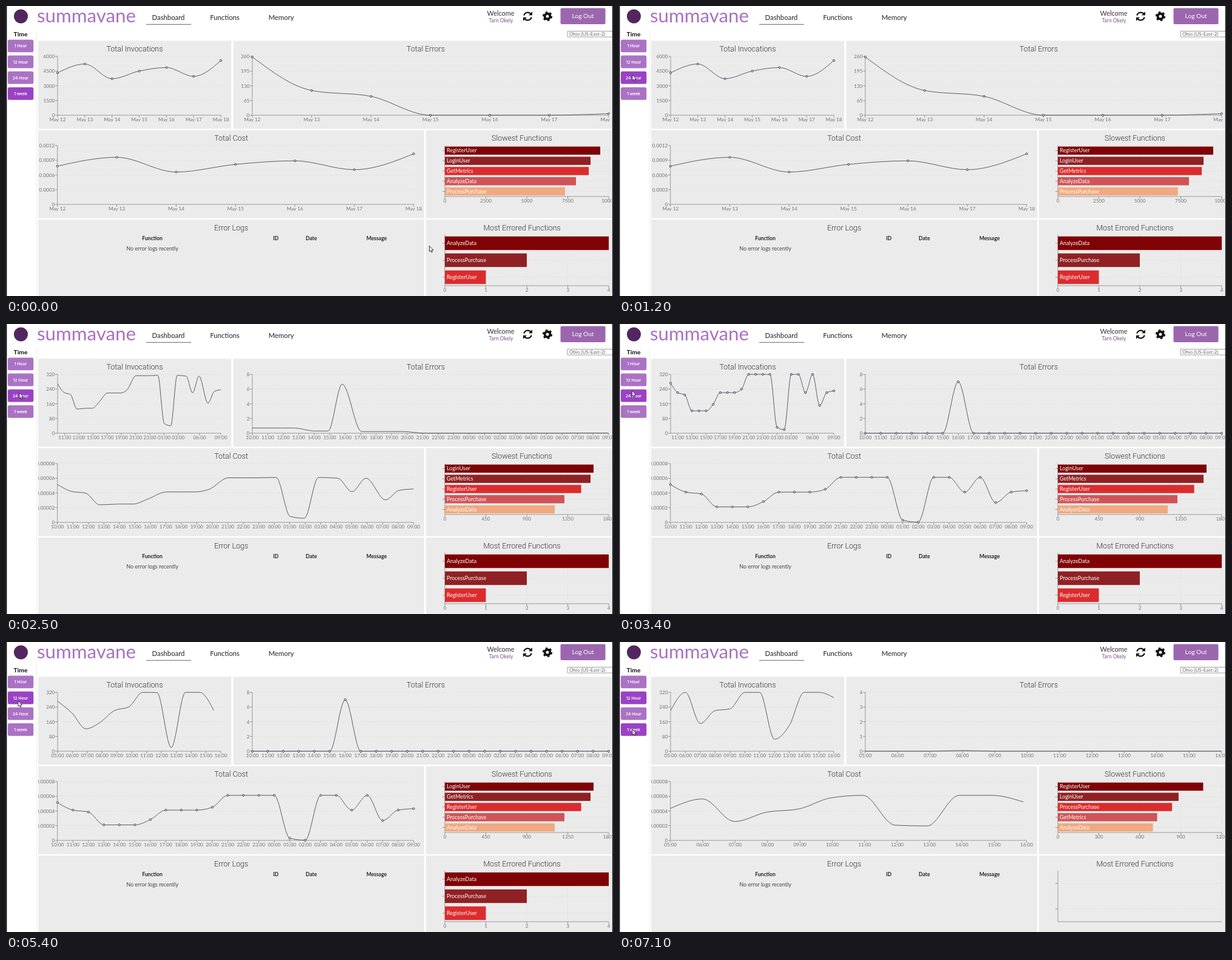
An HTML page for the animation above (7.2 s loop, 1000 by 478 pixels).

```html
<!DOCTYPE html>
<html lang="en">
<head>
<meta charset="utf-8">
<title>Dashboard</title>
<style>
html, body { margin: 0; width: 100%; height: 100%; overflow: hidden; background: #fff; }
svg { display: block; width: 100vw; height: 100vh; font-family: Lato, "Open Sans", sans-serif; }
.title { font: 300 12.4px Roboto, sans-serif; fill: #333; text-anchor: middle; }
.tick { font-size: 8.2px; fill: #747474; }
.axis { stroke: #777; stroke-width: .7; fill: none; }
.grid { stroke: #d9d9d9; stroke-width: .7; stroke-dasharray: 2 2; fill: none; }
.line { stroke: #4a4d54; stroke-width: .9; fill: none; }
.dot { stroke: #363d4c; stroke-width: .9; fill: #d4d6dc; }
.name { font-size: 8.9px; fill: #fff; }
.btn { font: 600 6.7px Inter, sans-serif; fill: #fff; text-anchor: middle; }
.mid { text-anchor: middle; }
.end { text-anchor: end; }
.head { font-size: 8.6px; font-weight: 700; fill: #222; text-anchor: middle; }
.note { font-size: 9px; fill: #444; text-anchor: middle; }
</style>
</head>
<body>
<svg viewBox="0 0 1000 478" preserveAspectRatio="none">
  <clipPath id="view"><rect x="53" y="57" width="945" height="421"/></clipPath>
  <rect width="1000" height="478" fill="#fff"/>
  <path d="M50.5 40V478" stroke="#ececec"/>

  <circle cx="24.5" cy="17" r="11.5" fill="#54265f"/>
  <text x="51" y="26.5" font-size="31.3" fill="#a972c1">summavane</text>
  <g class="mid" font-size="11.3" fill="#222">
    <text x="267.5" y="22.5">Dashboard</text>
    <text x="360.5" y="22.5">Functions</text>
    <text x="453.5" y="22.5">Memory</text>
  </g>
  <path d="M231 30.3H305" stroke="#85808a" stroke-width="1.3"/>
  <g class="mid">
    <text x="815" y="16" font-size="10.9" fill="#38293f">Welcome</text>
    <text x="815.5" y="27" font-size="8.5" fill="#7d5092">Tarn Okely</text>
  </g>
  <g fill="none" stroke="#111" stroke-width="2.2">
    <path d="M853.3 15.5A6.5 6.5 0 0 1 864.5 12.8M865.7 18.5A6.5 6.5 0 0 1 854.5 21.2"/>
    <path d="M867 9.3V15.3H861ZM852 24.7V18.7H858Z" fill="#111" stroke="none"/>
    <circle cx="892" cy="17" r="4.4" stroke-width="3.8"/>
    <circle cx="892" cy="17" r="6.9" stroke-width="2.4" stroke-dasharray="3.61 3.61"/>
  </g>
  <rect x="913.5" y="3.5" width="74" height="26.5" rx="2" fill="#9c66af"/>
  <text class="mid" x="950.5" y="20.3" font-size="10.2" fill="#fff">Log Out</text>
  <path d="M999 41.5H925V51H999" fill="#fff" stroke="#888" stroke-width=".8"/>
  <text x="928" y="49.2" font-size="8" fill="#666">Ohio (US-East-2)</text>

  <text class="mid" x="24" y="50" font-size="10.3" font-weight="700" fill="#111">Time</text>
  <g id="buttons"></g>
  <g clip-path="url(#view)"><g id="panels"></g><g id="charts"></g></g>
  <path d="M.7 0V478M999.5 0V478" stroke="#15131a" stroke-width="1.4"/>
  <path id="cursor" d="M0 0V9.2L2.1 7.4L3.6 10.6L5.1 9.9L3.7 6.8H6.5Z" fill="#fff" stroke="#222" stroke-width=".9"/>
</svg>
<script>
const LOOP = 7200, LINE_MS = 1875, BAR_MS = 500, PLOT = 97;
const DAY_AT = 1300, HALF_AT = 5945;
const $ = id => document.getElementById(id);
const n = v => +v.toFixed(2);
const lerp = (a, b, p) => a + (b - a) * p;
const clamp = p => Math.max(0, Math.min(1, p));
const smooth = p => (p = clamp(p), p * p * (3 - 2 * p));
const range = (len, f) => Array.from({ length: len }, (_, i) => f(i));
const text = (x, y, s, cls) => `<text x="${n(x)}" y="${n(y)}" class="${cls}">${s}</text>`;
const rect = (x, y, w, h, fill, rx = 0) =>
  `<rect x="${n(x)}" y="${n(y)}" width="${n(w)}" height="${n(h)}" rx="${rx}" fill="${fill}"/>`;
const path = (d, cls) => `<path d="${d}" class="${cls}"/>`;

// cubic-bezier(.25, .1, .25, 1)
function ease(x) {
  if (x <= 0 || x >= 1) return clamp(x);
  let lo = 0, hi = 1, s;
  for (let i = 0; i < 24; i++) {
    s = (lo + hi) / 2;
    if (.75 * s * (1 - s) + s ** 3 < x) lo = s; else hi = s;
  }
  return .3 * s * (1 - s) ** 2 + 3 * s * s * (1 - s) + s ** 3;
}

// Monotone cubic through the points
function curve(pts) {
  const last = pts.length - 1;
  const slope = i => (pts[i + 1][1] - pts[i][1]) / ((pts[i + 1][0] - pts[i][0]) || 1e-6);
  const inner = i => {
    const h0 = pts[i][0] - pts[i - 1][0], h1 = pts[i + 1][0] - pts[i][0];
    const s0 = slope(i - 1), s1 = slope(i);
    const p = (s0 * h1 + s1 * h0) / ((h0 + h1) || 1e-6);
    return (Math.sign(s0) + Math.sign(s1)) * Math.min(Math.abs(s0), Math.abs(s1), Math.abs(p) / 2) || 0;
  };
  const m = pts.map((_, i) => i && i < last ? inner(i) : 0);
  m[0] = (3 * slope(0) - m[1]) / 2;
  m[last] = (3 * slope(last - 1) - m[last - 1]) / 2;
  let d = `M${n(pts[0][0])} ${n(pts[0][1])}`;
  for (let i = 0; i < last; i++) {
    const [x0, y0] = pts[i], [x1, y1] = pts[i + 1], h = (x1 - x0) / 3;
    d += `C${[x0 + h, y0 + h * m[i], x1 - h, y1 - h * m[i + 1], x1, y1].map(n).join(" ")}`;
  }
  return d;
}

// Load in percent: per day, and per hour from 10:00 to 16:00 next day
const daily = [72, 87, 62, 75, 81, 66, 93];
const hourly = [85, 69, 65, 38, 38, 38, 49, 69, 69, 69, 75, 100, 100, 100, 100, 10, 6, 100, 100,
  69, 100, 47, 69, 72, 100, 100, 20, 44, 100, 100, 91];
const day = hourly.slice(0, 24), half = hourly.slice(19);
const dailyCost = v => v - 7, hourlyCost = v => .81 * v - 4.4;

const hours = (from, len) => range(len, i => String((from + i) % 24).padStart(2, "0") + ":00");
const weekX = range(7, i => "May " + (12 + i)), dayX = hours(10, 24), halfX = hours(5, 12);
const narrowX = dayX.map((s, i) => (i < 18 ? i % 2 : i % 3 === 2) ? s : "");

const state = (start, labels, max, digits, percent) => ({ start, labels, max, digits, percent });
const lines = [
  { x0: 85, x1: 354, top: 83, states: [
    state(-1e9, weekX, 6000, 0, daily),
    state(DAY_AT, narrowX, 320, 0, day),
    state(5380, halfX, 320, 0, half)] },
  { x0: 405.7, x1: 992.7, top: 83, states: [
    state(-1e9, weekX, 260, 0, [99, 42, 32, 0, 0, 0, 2.6]),
    state(DAY_AT, dayX, 8, 0, day.map((_, i) => i === 6 ? 87.5 : 0)),
    state(5510, halfX, 4, 0, half.map(() => 0))] },
  { x0: 84.7, x1: 671.6, top: 230, states: [
    state(-1e9, weekX, .0012, 4, daily.map(dailyCost)),
    state(DAY_AT, dayX, .00008, 5, day.map(hourlyCost)),
    state(6200, halfX, .00008, 5, half.map(hourlyCost))] }
];

const reds = ["#7f0205", "#8f2124", "#dc2b2d", "#d05457", "#f0a980"];
const slowest = [
  { start: -1e9, step: 2500,
    bars: { RegisterUser: 9480, LoginUser: 8890, GetMetrics: 8780, AnalyzeData: 8000, ProcessPurchase: 7330 } },
  { start: DAY_AT, step: 450,
    bars: { LoginUser: 1633, GetMetrics: 1600, RegisterUser: 1497, ProcessPurchase: 1313, AnalyzeData: 1207 } },
  { start: HALF_AT, step: 300,
    bars: { RegisterUser: 1064, LoginUser: 884, ProcessPurchase: 836, GetMetrics: 727, AnalyzeData: 696 } }
];
const errored = [
  { start: -1e9, step: 1, bars: { AnalyzeData: 4, ProcessPurchase: 2, RegisterUser: 1 } },
  { start: HALF_AT, step: 0, bars: {} }
];

// The newest state that has begun, and the one before it
function current(states, t) {
  const i = states.filter(s => s.start <= t).length - 1;
  return [states[i], states[i - 1]];
}

function lineChart({ x0, x1, top, states }, t) {
  const [now, prev] = current(states, t), { labels, max, digits, percent } = now;
  const base = top + PLOT;
  const at = (v, i) => [lerp(x0, x1, i / (v.length - 1)), base - PLOT * v[i] / 100];
  const p = prev ? ease((t - now.start) / LINE_MS) : 1;
  const pts = percent.map((_, i) => {
    const to = at(percent, i);
    if (p === 1) return to;
    const from = at(prev.percent, Math.floor(i * prev.percent.length / percent.length));
    return to.map((v, k) => lerp(from[k], v, p));
  });
  let grid = "", ticks = `M${x0} ${top}V${base}H${x1}`, out = "";
  for (let i = 0; i <= 4; i++) {
    const y = base - PLOT * i / 4;
    if (i) grid += `M${x0} ${y}H${x1}`;
    ticks += `M${x0 - 4} ${y}h4`;
    out += text(x0 - 4.5, y + 3, i ? (max * i / 4).toFixed(digits) : 0, "tick end");
  }
  labels.forEach((s, i) => {
    if (!s) return;
    const x = at(percent, i)[0];
    ticks += `M${n(x)} ${base}v4`;
    out += text(x, base + 10.2, s, "tick mid");
  });
  out = path(grid, "grid") + path(ticks, "axis") + out + path(curve(pts), "line");
  if (p === 1) out += pts.map(([x, y]) => `<circle cx="${n(x)}" cy="${n(y)}" r="1.6" class="dot"/>`).join("");
  return out;
}

function barChart(states, top, base, t) {
  const [now, prev] = current(states, t), { step } = now;
  const widths = s => Object.values(s.bars).map(v => 67.5 * v / s.step);
  const names = Object.keys(now.bars), to = widths(now), from = prev ? widths(prev) : to;
  const p = prev ? ease((t - now.start) / BAR_MS) : 1;
  const rows = names.length || 2, band = (base - top) / rows;
  let grid = "", ticks = `M723 ${top}V${base}H993`, out = "";
  for (let i = 0; i < rows; i++) {
    const y = top + band * (i + .5);
    grid += `M723 ${n(y)}H993`;
    ticks += `M719 ${n(y)}h4`;
    if (!names[i]) continue;
    out += rect(723, y - band * .4, lerp(from[i], to[i], p), band * .8, reds[i]);
    if (p === 1) out += text(726, y + 3, names[i], "name");
  }
  for (let i = step ? 0 : 4; i <= 4; i++) {
    const x = 723 + 67.5 * i;
    grid += `M${x} ${top}V${base}`;
    if (!step) continue;
    ticks += `M${x} ${base}v4`;
    out += text(x, base + 10.2, i * step, "tick mid");
  }
  return path(grid, "grid") + path(ticks, "axis") + out;
}

// Cursor legs: start, end, destination
const legs = [[0, 700, 22, 113.5], [3250, 3750, 20, 97], [6400, 6950, 22, 144]];
function cursorAt(t) {
  let x = 697.5, y = 395.5;
  for (const [a, b, tx, ty] of legs) {
    const p = smooth((t - a) / (b - a));
    x = lerp(x, tx, p);
    y = lerp(y, ty, p);
  }
  return [x, y];
}

function buttons(t, cx, cy) {
  const picked = t < 800 ? 3 : t < 4500 ? 2 : 1;
  return ["1 Hour", "12 Hour", "24 Hour", "1 week"].map((s, i) => {
    const y = 55.4 + 26.2 * i;
    const hover = cx > 3 && cx < 45 && cy > y && cy < y + 20.8;
    return rect(3, y, 42.3, 20.8, i === picked || hover ? "#9a42c5" : "#ab72c4", 2.5) + text(24, y + 12.9, s, "btn");
  }).join("");
}

const panel = (x, y, w, s) => rect(x, y, w, 145, "#ebebeb", 1) + text(x + w / 2, y + 17.5, s, "title");
$("panels").innerHTML =
  panel(53, 57.3, 318, "Total Invocations") + panel(374.5, 57.3, 634, "Total Errors") +
  panel(53, 204.7, 636, "Total Cost") + panel(692, 204.7, 316, "Slowest Functions") +
  panel(53, 352, 636, "Error Logs") + panel(692, 352, 316, "Most Errored Functions") +
  text(241, 386.2, "Function", "head") + text(444.5, 386.2, "ID", "head") +
  text(503, 386.2, "Date", "head") + text(610.5, 386.2, "Message", "head") +
  text(241, 402.5, "No error logs recently", "note");

function render(t) {
  const [cx, cy] = cursorAt(t);
  $("buttons").innerHTML = buttons(t, cx, cy);
  $("charts").innerHTML = lines.map(c => lineChart(c, t)).join("") +
    barChart(slowest, 230, 314, t) + barChart(errored, 377, 461, t);
  $("cursor").setAttribute("transform", `translate(${n(cx)} ${n(cy)})`);
}

const begin = performance.now();
function frame() {
  render((performance.now() - begin) % LOOP);
  requestAnimationFrame(frame);
}
frame();
</script>
</body>
</html>
```
